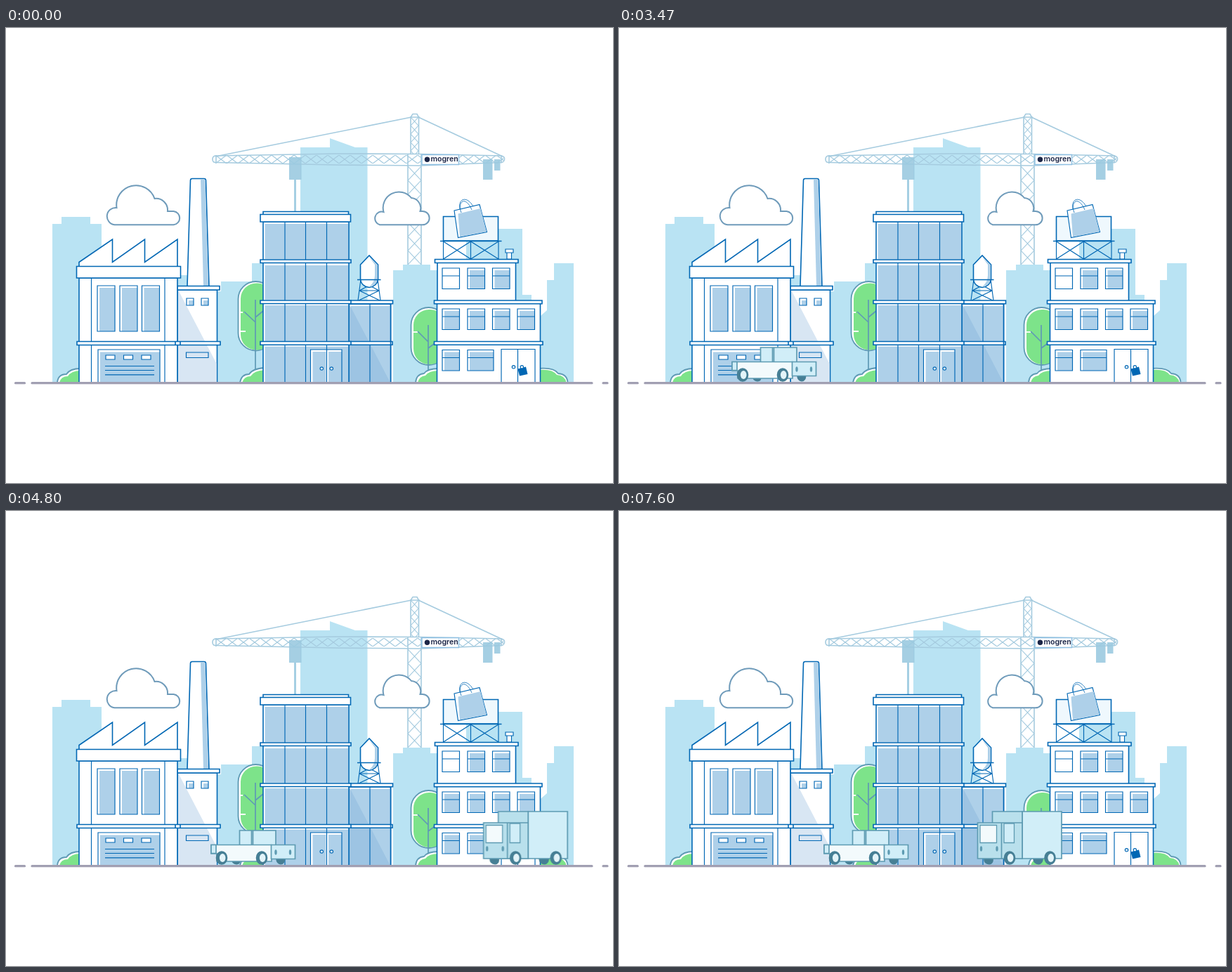
Recreate the animation shown at these times as an HTML page without scripts. Size 864x648 px, loop 8 s.

```html
<!DOCTYPE html>
<html lang="en">
<head>
<meta charset="utf-8">
<title>City street</title>
<style>
html, body { margin: 0; width: 100%; height: 100%; overflow: hidden; background: #fff; }
svg { display: block; width: 864px; height: 648px; }
.line { fill: none; stroke: #0067b4; stroke-width: 1.15; }
.wall { fill: #fff; stroke: #0067b4; stroke-width: 1.6; }
.thin { stroke-width: 1.15; }
.glass { fill: #aed0e9; }
.shade { fill: #d8e6f3; }
.dark { fill: #9dc4e3; }
.sky { fill: #b9e3f3; }
.crane { fill: none; stroke: #a5cbdf; stroke-width: 1.6; }
.load { fill: #9ccae0; fill-opacity: .9; }
.cloud { fill: #fff; stroke: #6f9bba; stroke-width: 2; }
.leaf { fill: #7de38a; }
.rim { fill: #fff; stroke: #5f9ab5; stroke-width: 1.8; }
.twig { fill: none; stroke: #5f9ab5; stroke-width: 1.7; }
.road { fill: none; stroke: #a19fb2; stroke-width: 3.2; stroke-linecap: round; }
.car { stroke: #5e9bb2; stroke-width: 1.7; }
.pale { fill: #f3fafc; }
.aqua { fill: #d1eef8; }
.teal { fill: #b9e0ec; }
.tyre { fill: #467f95; stroke: none; }
.sign { font: 600 10.6px Inter, "Open Sans", sans-serif; fill: #1b2547; }
#pickup, #truck { animation: 8s steps(1, end) infinite; }
#pickup { animation-name: pickup; }
#truck { animation-name: truck; }
@keyframes pickup {
  0% { transform: translateX(-439px); }
  32.48% { transform: translateX(-439px); animation-timing-function: steps(2, end); }
  34.1% { transform: translateX(-391px); }
  35.85% { transform: translateX(-342px); }
  36.6% { transform: translateX(-319px); }
  38.35% { transform: translateX(-272px); animation-timing-function: steps(4, end); }
  41.6% { transform: translateX(-174px); }
  43.35% { transform: translateX(-131px); animation-timing-function: steps(3, end); }
  45.85%, 100% { transform: none; }
}
@keyframes truck {
  0% { transform: translateX(380px); }
  54.98% { transform: translateX(350px); animation-timing-function: steps(3, end); }
  57.48% { transform: translateX(254px); animation-timing-function: steps(4, end); }
  60.8% { transform: translateX(141px); animation-timing-function: steps(4, end); }
  64.1% { transform: translateX(52px); }
  64.98% { transform: translateX(32px); animation-timing-function: steps(3, end); }
  67.48% { transform: translateX(7px); animation-timing-function: steps(5, end); }
  71.6%, 100% { transform: none; }
}
</style>
</head>
<body>
<svg viewBox="0 0 864 648">
  <defs>
    <pattern id="jib" x="298" y="180" width="16" height="14" patternUnits="userSpaceOnUse">
      <path class="crane" style="stroke-width:1.3" d="M0 1L16 13M16 1L0 13"/>
    </pattern>
    <pattern id="mast" x="572" y="197" width="19" height="20" patternUnits="userSpaceOnUse">
      <path class="crane" style="stroke-width:1.2" d="M0 0L19 20M19 0L0 20"/>
    </pattern>
    <pattern id="top" x="576" y="127" width="11" height="12" patternUnits="userSpaceOnUse">
      <path class="crane" style="stroke-width:1.1" d="M0 0L11 12M11 0L0 12"/>
    </pattern>
    <g id="tall">
      <path class="glass" d="M3 3H25V65H3z"/>
      <path class="line" d="M0 0H25V65H0z"/>
    </g>
    <g id="win">
      <path fill="#fff" d="M0 0H24.5V29.5H0z"/>
      <path class="glass" d="M3 3H24.5V29.5H3z"/>
      <path class="line" d="M0 0H24.5V29.5H0zM0 11H24.5"/>
    </g>
    <g id="wheel">
      <ellipse class="tyre" rx="8.3" ry="9.8"/>
      <ellipse cx="1.2" rx="4.3" ry="6" fill="#e3f4f9"/>
    </g>
    <ellipse id="lamp" rx="1.7" ry="3.8" fill="#5e9bb2"/>
  </defs>

  <!-- skyline -->
  <g class="sky">
    <path d="M66 505V279H79V269H120V279H136V505z"/>
    <path d="M244 505V352H262V375H306V361H350V335H368V505z"/>
    <path d="M419 505V170H461V157L497 170H514.500V505z"/>
    <path d="M551 505V345H565V337H604V345H620V505z"/>
    <path d="M655 330V286H735V380H748V400H761V410L770 402V359H780V335H808V505H655z"/>
  </g>

  <!-- crane -->
  <path fill="url(#mast)" d="M572 197h19V337h-19z"/>
  <path fill="url(#top)" d="M576 127h11V180h-11z"/>
  <path fill="url(#jib)" d="M298 181H708V193H298z"/>
  <g class="crane">
    <path d="M572 337V180M591 337V180M576 180V127L579 122.500H585L587.500 127V180M575 127H589"/>
    <path d="M577 127L298 183M587 127L707 183"/>
    <path d="M299 182L470 179L590 179.500L706 182M299 191.500L470 195L590 196L706 191.500"/>
    <path d="M299 182Q294 182 294 187T299 191.500zM705 182Q710 183 709.500 187T705 191.500z"/>
  </g>
  <path class="load" d="M403 184H420.500V216H403zM410 216H413V262H410zM679 187H692.500V216H679zM695 187H703.500V203H695z"/>
  <path d="M592 180.500H644.500V194.500H592z" fill="#fff" stroke="#8fc0e2" stroke-width="1.4"/>
  <circle cx="599.500" cy="187.300" r="3.7" fill="#1b2547"/>
  <text class="sign" x="604.500" y="190.300">mogren</text>

  <!-- clouds -->
  <path class="cloud" d="M154.500 280.300A12.200 12.200 0 0 1 157.500 256A27.900 27.900 0 0 1 211.500 243A16.500 16.500 0 0 1 230 261H238.500A9.700 9.700 0 0 1 238.500 280.300z"/>
  <path class="cloud" d="M532 280.300A9.500 9.500 0 0 1 537.500 262A22.600 22.600 0 0 1 577 242A14.500 14.500 0 0 1 589.500 261H593A9.650 9.650 0 0 1 593 280.300z"/>

  <!-- trees and bushes -->
  <rect class="rim" x="330.500" y="361" width="50" height="98.500" rx="25"/>
  <rect class="leaf" x="334" y="363.500" width="46" height="95" rx="22"/>
  <path d="M333 432H341M333 405H337" stroke="#fff" stroke-width="1.8" fill="none"/>
  <path class="twig" d="M355 387V505M355 419L339 404M355 412L366 403"/>
  <rect class="rim" x="576.500" y="398" width="50" height="82" rx="25"/>
  <rect class="leaf" x="580" y="401" width="46" height="78" rx="22"/>
  <path d="M579 433H586" stroke="#fff" stroke-width="1.8" fill="none"/>
  <path class="twig" d="M601 423V493M601 447L586 432M601 456L613 447"/>
  <g class="rim">
    <path d="M73 505Q74 493 86 493Q91 485 106 485V505z"/>
    <path d="M333 505Q335 493 346 493Q351 485 368 484V505z"/>
    <path d="M583 505Q584 493 595 492Q600 485 616 485V505z"/>
    <path d="M758 485Q780 483 786 492Q799 493 799.500 505H758z"/>
  </g>
  <g class="leaf">
    <path d="M76 505Q78 496 88 496Q93 488 106 488V505z"/>
    <path d="M336 505Q339 496 348 496Q353 488 368 487V505z"/>
    <path d="M586 505Q588 496 597 495Q602 488 616 488V505z"/>
    <path d="M758 487Q778 485 784 494Q796 495 797.500 505H758z"/>
  </g>

  <!-- factory -->
  <path class="wall" d="M258 368L262.500 217Q262.600 214.500 265 214.500H282Q284.300 214.500 284.500 217L289 368z"/>
  <path class="glass" d="M277 216H283.500L288 367H281z"/>
  <path class="wall" d="M244 373H300.500V505H244z"/>
  <path class="shade" d="M245 373L299.700 478V505H245z"/>
  <path class="wall" d="M244 367.500H304V373H244z"/>
  <path class="wall" d="M104 340V333.500L151.500 301V333.500L197.500 301V333.500L244 301V340z"/>
  <path class="wall" d="M104 356H244V505H104z"/>
  <path class="wall" d="M100.500 339.500H248.500V356H100.500z"/>
  <path class="line" d="M121.500 356V505M226 356V505"/>
  <use href="#tall" x="130" y="367"/>
  <use href="#tall" x="162" y="367"/>
  <use href="#tall" x="193.500" y="367"/>
  <path class="glass" d="M134 461.500H219V505H134zM260 388H267V395H260zM281 388H288V395H281z"/>
  <path class="line" d="M131 505V458H219V505M141 481.500H211M141 487.500H211M141 493.800H211"/>
  <path class="wall thin" d="M142 466H155V472H142zM167.500 466H180.500V472H167.500zM193 466H206V472H193z"/>
  <path class="line" d="M257 385H267V395H257zM278 385H288V395H278zM256.500 462H288V469.500H256.500z"/>
  <path class="wall" d="M241 446.500H305V451.500H241zM101 446.500H248V451.500H101z"/>

  <!-- water tank -->
  <path class="line" d="M505 358L501 388M529 358L533 388M503 374H531M503 374L532 388M531 374L502 388M505 360L531 374M529 360L503 374"/>
  <path class="wall" d="M504.500 337L517 324L529.500 337V358Q528 368 517 369.500Q506 368 504.500 358z"/>
  <path class="glass" d="M517 326L528.700 337V358Q527 367 517 368.600Q525 362 525 352V337z"/>
  <path class="line" style="stroke-width:1.6" d="M500 358.500H533.500"/>

  <!-- office -->
  <path class="wall" d="M488 393H547.500V505H488z"/>
  <path class="glass" d="M491 396H547V505H491z"/>
  <path class="dark" d="M489 394L547 505H489z"/>
  <path class="line" d="M518 393V505"/>
  <path class="wall" d="M488 388H550.500V392.800H488zM488 446.500H550V451.300H488z"/>
  <path class="line" style="stroke-width:1.6" d="M547.500 393V505"/>
  <path class="wall" d="M366 276H488V505H366z"/>
  <path class="glass" d="M368.500 279H487V329H368.500zM368.500 338H487V387H368.500zM368.500 395H487V446H368.500zM368.500 453.500H487V505H368.500z"/>
  <path class="line" d="M397 276V505M426.500 276V505M456.500 276V505"/>
  <path class="wall" d="M366 261.500H487.500V266H366z"/>
  <path class="wall" d="M362 265.500H490.500V276H362zM362 330H491V334.500H362zM362 388H491V392.500H362zM362 446.500H491V451.300H362z"/>
  <path fill="#fff" d="M433.500 458H478V505H433.500z"/>
  <path class="glass" d="M436.500 461H455.500V505H436.500zM459 461H478V505H459z"/>
  <path class="line" d="M433.500 505V458H478V505M456.500 458V505"/>
  <g class="wall thin"><circle cx="449.300" cy="485" r="2.200"/><circle cx="463.300" cy="485" r="2.200"/></g>

  <!-- shop -->
  <path class="wall" d="M614 334H725.500V390H614zM613.500 392H760.500V505H613.500z"/>
  <path class="wall" d="M610.500 329.500H729V334.500H610.500zM609.500 388H763V392.800H609.500zM609.500 446.500H764V451.300H609.500z"/>
  <path class="line" d="M621 342H645.500V371.500H621zM621 353H645.500"/>
  <use href="#win" x="657" y="342"/>
  <use href="#win" x="692.500" y="342"/>
  <use href="#win" x="621" y="400"/>
  <use href="#win" x="657" y="400"/>
  <use href="#win" x="692.500" y="400"/>
  <use href="#win" x="728" y="400"/>
  <use href="#win" x="621" y="458.500"/>
  <path class="glass" d="M660 461.500H694V488H660z"/>
  <path class="line" d="M657 458.500H694V488H657zM657 469.500H694M705 505V457.500H753V505M728.500 457.500V505"/>
  <path d="M728.500 485.500L740 482.500L742.500 493L731 495.500z" fill="#0067b4"/>
  <g class="wall thin"><circle cx="722.500" cy="482.800" r="2.200"/><circle cx="734.300" cy="482.800" r="2.200"/></g>
  <path class="wall thin" d="M713 320H719.500V329H713zM711 315H722V320H711z"/>
  <path class="line" d="M622.500 303V329M661.500 303V329M701 303V329M622.500 304L661.500 329L701 304M622.500 329L661.500 304L701 329"/>
  <path d="M622.500 268.500H700.500V303H622.500z" fill="#eff8fd" stroke="#0067b4" stroke-width="1.6"/>
  <path class="line" style="stroke-width:1.6" d="M618 303.500H705.500"/>
  <path class="line" style="stroke-width:.8" d="M646 258C643 242 657 238 666 256"/>
  <path class="wall thin" d="M638 260L674 251.500L684.500 290.500L643.500 298.500z"/>
  <path class="glass" d="M643.500 264.500L675.500 257L684 290L646 297.300z"/>
  <path class="line" style="stroke-width:.8" d="M648 263C642 247 654 238 663 259"/>

  <path class="road" d="M13.500 505.700H26.500M37 505.700H834M850 505.700H856"/>

  <!-- pickup -->
  <g id="pickup">
    <path class="tyre" d="M321 496H334Q334 503.500 328 503.500Q321 503 321 496zM384 495H397.500Q397 503.500 391 503.500Q385 503 384 495z"/>
    <g class="car">
      <path class="aqua" d="M332.500 455H384V476H332.500z"/>
      <path class="pale" d="M292 475.500H378V499H300V488H292z"/>
      <path class="aqua" d="M377.500 475.500H411.500V495.500H377.500z"/>
      <path class="aqua" d="M292 475.500H299V487.500H292z"/>
      <path fill="none" d="M351.500 455V475M349.500 455V475"/>
    </g>
    <use href="#lamp" x="384" y="486"/>
    <use href="#lamp" x="404.500" y="486"/>
    <use href="#wheel" x="307" y="494"/>
    <use href="#wheel" x="364" y="494"/>
  </g>

  <!-- delivery truck -->
  <g id="truck">
    <path class="tyre" d="M519 495H533Q533 503.500 527 503.500Q519 503 519 495zM589 495H604Q603 503.500 597 503.500Q590 503 589 495z"/>
    <g class="car">
      <path class="aqua" d="M574 428H630V495H574z"/>
      <path class="teal" d="M531.500 428H574V495H531.500z"/>
      <path class="teal" d="M510.500 444H574V495H510.500zM544.500 444V495"/>
      <path class="pale" style="stroke-width:1.3" d="M514 447.500H537.500V472.500H514z"/>
      <path class="aqua" style="stroke-width:1.3" d="M548 445H562.500V472.500H548z"/>
    </g>
    <use href="#lamp" x="515.500" y="481"/>
    <use href="#lamp" x="538" y="481"/>
    <use href="#wheel" x="556" y="494"/>
    <use href="#wheel" x="613.500" y="494"/>
  </g>
</svg>
</body>
</html>
```
